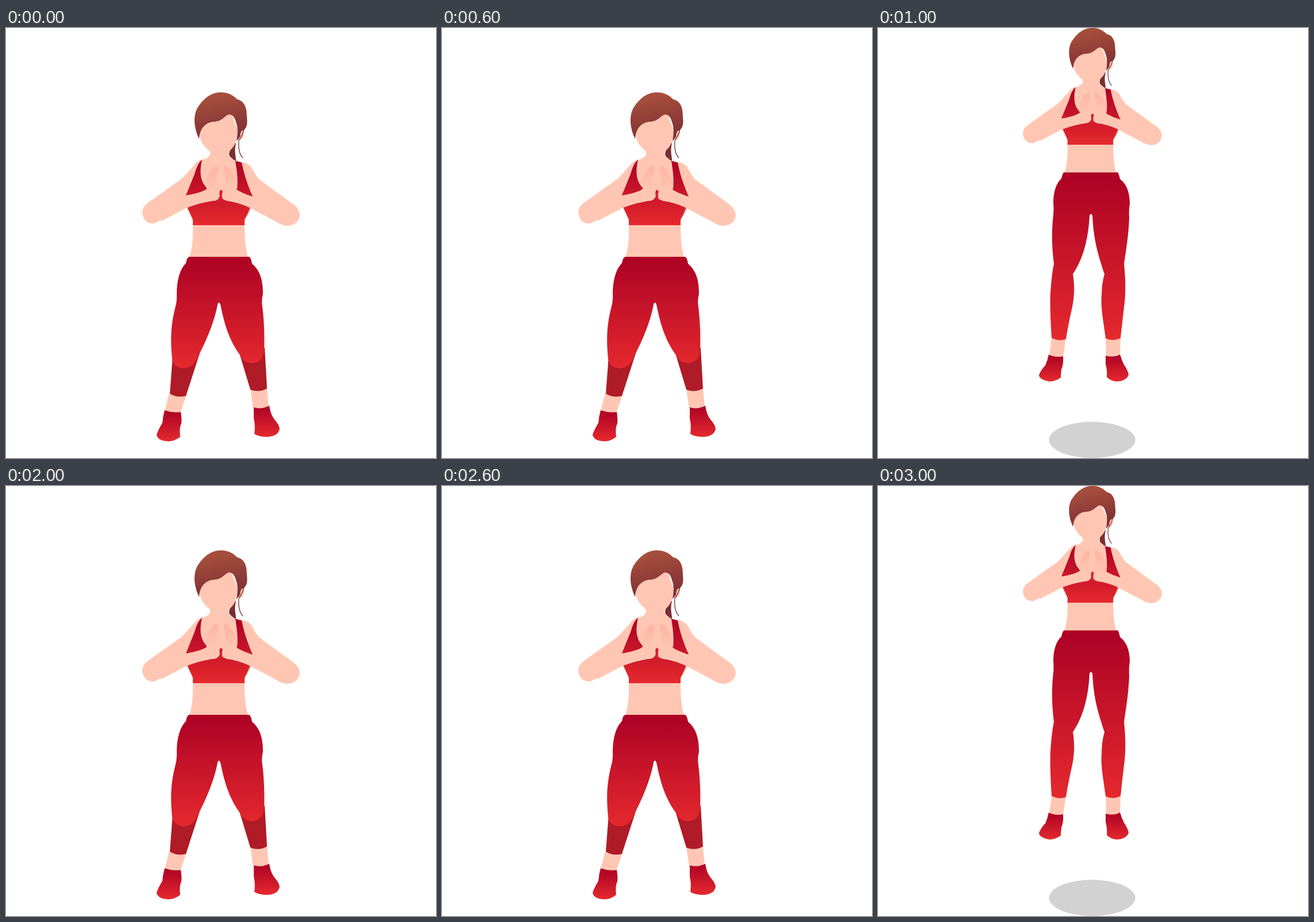
An HTML page that plays this animation: 748x748 px, repeating every 4 s.

```html
<!DOCTYPE html>
<html lang="en">
<head>
<meta charset="utf-8">
<title>Jump squat</title>
<style>
  html, body { margin: 0; height: 100%; overflow: hidden; background: #fff; }
  svg { display: block; width: 100%; height: 100%; }
  .skin { fill: #ffc7b3; }
  .red { fill: url(#red); }
  .calf { fill: #af1b27; }
  .dark { fill: #7b2d34; }
</style>
</head>
<body>
<svg viewBox="0 0 748 748">
  <defs>
    <linearGradient id="red" x2="0" y2="1">
      <stop offset=".04" stop-color="#ae0325"/><stop offset="1" stop-color="#e5292e"/>
    </linearGradient>
    <linearGradient id="hair" x1=".4" x2=".6" y2="1">
      <stop offset=".1" stop-color="#a64e3c"/><stop offset="1" stop-color="#7b2c35"/>
    </linearGradient>
    <linearGradient id="hand" x2="0" y2="1">
      <stop offset="0" stop-color="#ffb3a3"/><stop offset="1" stop-color="#ffc7b3"/>
    </linearGradient>
  </defs>

  <g id="stand">
    <path class="skin" d="M284 635L276 667Q290 671 303 670L314 638ZM425 628L430 662Q445 666 457 660L454 626Z"/>
    <path class="calf" d="M290 570L285 636Q297 644 313 640L337 566ZM406 566L425 629Q440 635 454 627L450 556Z"/>
    <path class="red" d="M319 398H423Q426 399 428 410C443 423 447 440 447 462Q444 475 446 485C449 510 450 535 449 560C447 578 438 583 427 583C415 582 410 576 408 570C385 540 378 505 373 481Q370 474 368 481C362 515 345 550 335 570C328 588 318 592 308 592C298 591 290 585 289 576C286 545 286 520 294 488Q298 475 297 463C297 440 302 420 313 409Q315 398 319 398Z"/>
    <path class="red" d="M276 665Q290 670 304 668Q306 680 305 688Q301 695 303 711Q295 718 284 719Q265 719 262 708Q263 702 272 687Q273 675 276 665Z"/>
    <path class="red" d="M431 660Q445 664 458 657Q460 672 467 681Q475 690 476 697Q474 709 458 711Q440 712 432 706Q434 690 431 680Z"/>
  </g>

  <g id="jump">
    <ellipse cx="372.5" cy="716.5" rx="75" ry="31.5" fill="#d2d2d2"/>
    <path class="skin" d="M302 538L298 570Q310 574 322 572L327 538ZM396 538L397 571Q410 574 421 569L422 538Z"/>
    <path class="red" d="M324 251H417Q419 253 421 263C434 272 438 290 438 305Q436 318 437 330C436 360 431 390 428 410C431 440 431 465 428 485Q425 510 422 539Q410 546 396 540C392 510 387 485 389 465Q389 445 394 428C383 395 375 370 373 326Q370 321 368 326C366 370 355 405 339 428C342 445 342 465 338 485Q331 515 327 541Q315 546 302 539C300 510 299 480 300 460Q302 430 306 410C302 380 302 350 305 325Q306 315 305 304C305 285 310 270 319 262Q321 252 324 251Z"/>
    <path class="red" d="M297 568Q309 574 322 571Q323 585 319 594Q318 603 318 608Q310 614 299 615Q281 612 280 604Q283 595 291 587Q295 578 297 568Z"/>
    <path class="red" d="M396 570Q410 574 421 568Q424 578 428 586Q434 594 436 603Q432 614 416 615Q404 614 398 607Q399 595 396 585Z"/>
  </g>

  <g id="torso">
    <path class="dark" d="M396 200C389 212 386 219 390 224Q397 230 400 233C401 225 396 217 400 200Z"/>
    <!-- face, neck, shoulders and upper arms -->
    <path class="skin" d="M336 175C335 198 347 208 353 213C358 218 355 225 342 229Q334 229 328 238L306 262L247 304Q237 311 237 322Q240 341 258 340L314 312L330 345H410L427 314L470 337Q480 344 490 344Q508 343 511 326Q511 315 500 307L440 263Q435 257 430 248Q424 234 409 233C395 232 386 224 387 215C400 206 404 190 402 175L390 145H350Z"/>
    <path class="skin" d="M325 342H415Q415 380 421 398H319Q326 380 325 342Z"/>
    <path class="red" d="M341 229C336 252 338 267 350 279L372 290L402 280C404 262 401 245 399 231L410 234C414 255 421 275 429 293L425 311Q422 321 415 333V343H325V333L316 313L313 291L328 254Q333 235 341 229Z"/>
    <!-- forearms -->
    <path class="skin" d="M268 310L314 291Q343 286 350 279L372 281V292Q370 301 358 301Q338 304 314 313L270 336ZM470 310L428 293Q410 287 401 281L374 281V293Q377 301 392 302Q411 306 427 314L471 337Z"/>
    <path class="skin" d="M350 265H401V281H350Z"/>
    <path fill="#d91f2c" d="M373.5 281Q370 284 372 293L370 300H378Q374 294 377 284Z"/>
    <path fill="url(#hand)" d="M368 240C361 239 350 254 348 268Q347 277 351 282L370 281Q364 268 367 256Q371 244 368 240ZM380 240C388 240 399 257 401 269Q403 277 399 283L378 281Q384 270 381 256Q377 244 380 240Z"/>
    <ellipse class="skin" cx="409" cy="185" rx="5" ry="10" transform="rotate(15 409 185)"/>
    <path fill="url(#hair)" d="M336 193C325 170 326 148 335 136C348 117 362 112 374 112C388 112 396 118 402 124C416 127 419 140 419 155C421 170 417 175 413 178Q408 177 407 189L401 197C403 185 404 173 400 164C398 154 392 149 386 151C380 154 375 162 363 163C350 163 337 172 336 193Z"/>
    <path fill="none" stroke="#7b2d34" stroke-width="1.3" d="M414 176Q411 188 405 195C404 208 406 220 412 226"/>
  </g>
</svg>
<script>
  const [stand, jump, torso] = ['stand', 'jump', 'torso'].map(id => document.getElementById(id));
  const show = (el, on) => el.style.display = on ? '' : 'none';

  function draw(now) {
    const up = Math.floor(now / 1000) % 2 === 1;
    show(stand, !up);
    show(jump, up);
    torso.setAttribute('transform', up ? 'matrix(.883 0 0 .879 42.7 -98.6)' : '');
    requestAnimationFrame(draw);
  }
  draw(performance.now());
</script>
</body>
</html>
```
